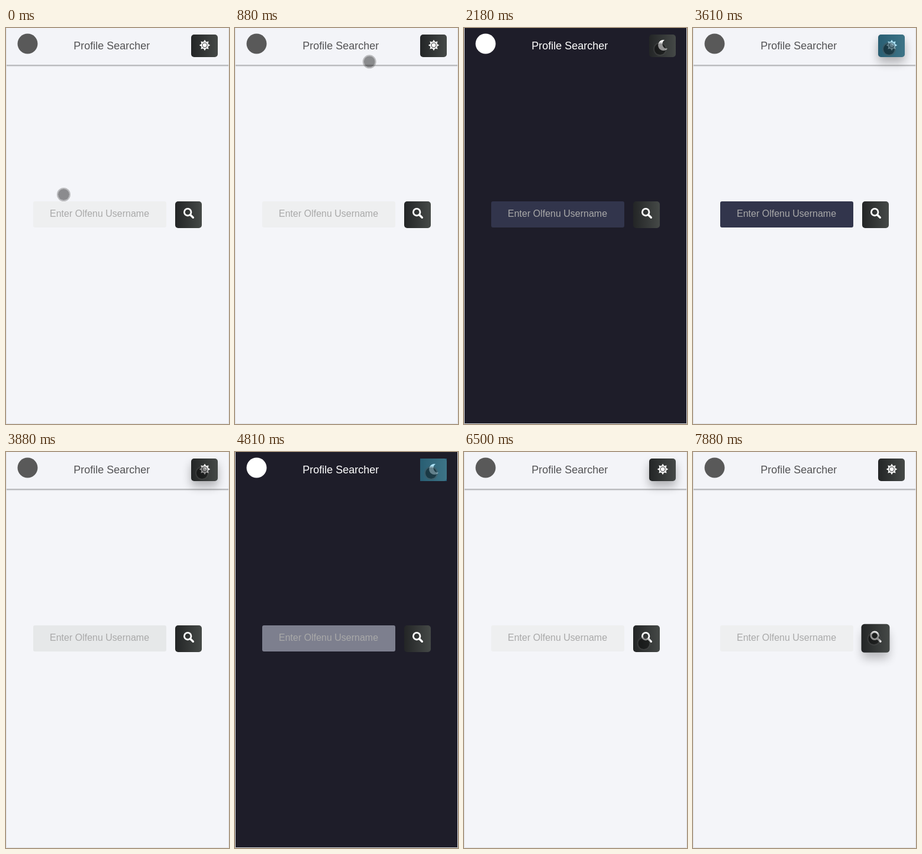
An HTML page that plays this animation: 377x667 px, repeating every 8000 ms.

```html
<!DOCTYPE html>
<html lang="en">
<head>
<meta charset="utf-8">
<title>Profile Searcher</title>
<style>
  html, body { margin: 0; width: 100%; height: 100%; overflow: hidden; }
  svg { display: block; width: 100%; height: 100%; }
  text { font-family: "Liberation Sans", Arial, sans-serif; }
</style>
</head>
<body>
<svg viewBox="0 0 377 667">
  <defs>
    <linearGradient id="metal">
      <stop stop-color="#232526"/>
      <stop offset="1" stop-color="#454947"/>
    </linearGradient>
    <filter id="blur" x="-80%" y="-80%" width="260%" height="260%">
      <feGaussianBlur stdDeviation="8"/>
    </filter>
    <filter id="edge" x="-5%" y="-50%" width="110%" height="200%">
      <feGaussianBlur stdDeviation="1.2"/>
    </filter>
  </defs>
  <rect id="page" width="377" height="667"/>
  <g id="bar">
    <rect x="-6" y="50" width="389" height="13.6" opacity=".36" filter="url(#edge)"/>
    <rect width="377" height="62" fill="#f3f4f8"/>
  </g>
  <circle id="logo" cx="36.5" cy="26.5" r="17"/>
  <text id="title" x="114.2" y="36" font-size="18">Profile Searcher</text>

  <rect id="field" x="46" y="292" width="225" height="44" rx="3"/>
  <text x="74" y="318" font-size="16" fill="#a9a9a9">Enter Olfenu Username</text>

  <rect id="themeShade" x="313" y="20" width="45" height="38" rx="5" filter="url(#blur)"/>
  <rect x="313" y="11" width="45" height="38" rx="5" fill="url(#metal)"/>
  <g id="sun" fill="#fff">
    <path id="rays"/>
    <circle cx="336" cy="29" r="4" stroke="#353738" stroke-width="1.1"/>
  </g>
  <path id="moon" fill="#fff" d="M339 20.2A9 9 0 1 0 344 34.8A8 8 0 0 1 339 20.2Z"/>
  <rect id="tap" x="313" y="11" width="45" height="38" fill="#33b5e5" opacity=".4"/>

  <rect id="searchShade" x="286" y="303" width="45" height="45" rx="5" filter="url(#blur)"/>
  <g id="search">
    <rect x="286" y="292" width="45" height="45" rx="5" fill="url(#metal)"/>
    <g fill="none" stroke="#fff" stroke-linecap="round">
      <circle cx="307.2" cy="310.2" r="5.8" stroke-width="2.8"/>
      <path d="M312 315L316.3 319.3" stroke-width="3.4"/>
    </g>
  </g>

  <g id="cursor">
    <circle r="9.5" fill-opacity=".43"/>
    <circle r="10.5" fill="none" stroke="#505050" stroke-opacity=".35" stroke-width="2"/>
  </g>
  <path d="M.5 0V666.5H376.5V0" fill="none" stroke="#e0e1e3"/>
</svg>
<script>
const LOOP = 8000, STEP = 120, FADE = 250, TAP = 200;
const LIGHT = [238, 239, 240], DARK = [50, 53, 76];

// Pointer moves: start, number of steps, end point.
const moves = [
  [150, 1, 97.5, 272.5], [430, 1, 102.5, 205.5], [580, 1, 82.5, 88.5], [730, 1, 192.5, 63.5],
  [880, 3, 326.5, 37.5], [1270, 2, 331.5, 35.5], [5780, 7, 304, 322.5], [6620, 3, 306, 314.5]
];
// Theme clicks: first visible moment, and how far the fade has run by then.
const clicks = [[1940, 30], [3610, 0], [4810, 150], [5510, 88]];

const $ = id => document.getElementById(id);
const set = (id, name, value) => $(id).setAttribute(name, value);
const show = (id, on) => set(id, "visibility", on ? "visible" : "hidden");
const lerp = (a, b, k) => a + (b - a) * k;
const smooth = k => k * k * (3 - 2 * k);
const clamp = k => Math.max(0, Math.min(1, k));
const ramp = (t, start, steps) => clamp((Math.floor((t - start) / STEP) + 1) / steps);

function pointer(t) {
  let x = 97.5, y = 280.5;
  for (const [start, steps, toX, toY] of moves) {
    const k = smooth(ramp(t, start, steps));
    x = lerp(x, toX, k);
    y = lerp(y, toY, k);
  }
  return [x, y];
}

function theme(t) {
  const past = clicks.filter(c => c[0] <= t);
  const night = past.length % 2 === 1;
  if (!past.length) return { night, tapped: false, fade: 0 };
  const [start, lead] = past.at(-1);
  const age = Math.floor((t - start) / STEP) * STEP + lead;
  const k = clamp(age / FADE);
  return { night, tapped: age < TAP, fade: night ? k : 1 - k };
}

const star = Array.from({ length: 16 }, (_, i) => {
  const r = i % 2 ? 6 : 9.3, a = i * Math.PI / 8;
  return [336 + r * Math.cos(a), 29 + r * Math.sin(a)].map(v => v.toFixed(2));
});
set("rays", "d", "M" + star.join("L") + "Z");

function draw(t) {
  const { night, tapped, fade } = theme(t);
  const hover = ramp(t, 7640, 3);
  set("page", "fill", night ? "#1e1d29" : "#f4f5f9");
  set("logo", "fill", night ? "#fff" : "#595959");
  set("title", "fill", night ? "#fff" : "#535355");
  set("field", "fill", `rgb(${LIGHT.map((v, i) => Math.round(lerp(v, DARK[i], fade)))})`);
  show("bar", !night);
  show("sun", !night);
  show("moon", night);
  show("tap", tapped);
  set("tap", "rx", night ? 0 : 5);
  set("themeShade", "opacity", night ? 0 : .28 * (ramp(t, 1700, 2) - hover));
  set("searchShade", "opacity", .24 * hover);
  set("search", "transform",
    `translate(308.5 ${314.5 - .7 * hover}) scale(${1 + .065 * hover}) translate(-308.5 -314.5)`);
  set("cursor", "transform", `translate(${pointer(t)})`);
}

const start = performance.now();
function tick() {
  draw((performance.now() - start) % LOOP);
  requestAnimationFrame(tick);
}
tick();
</script>
</body>
</html>
```
